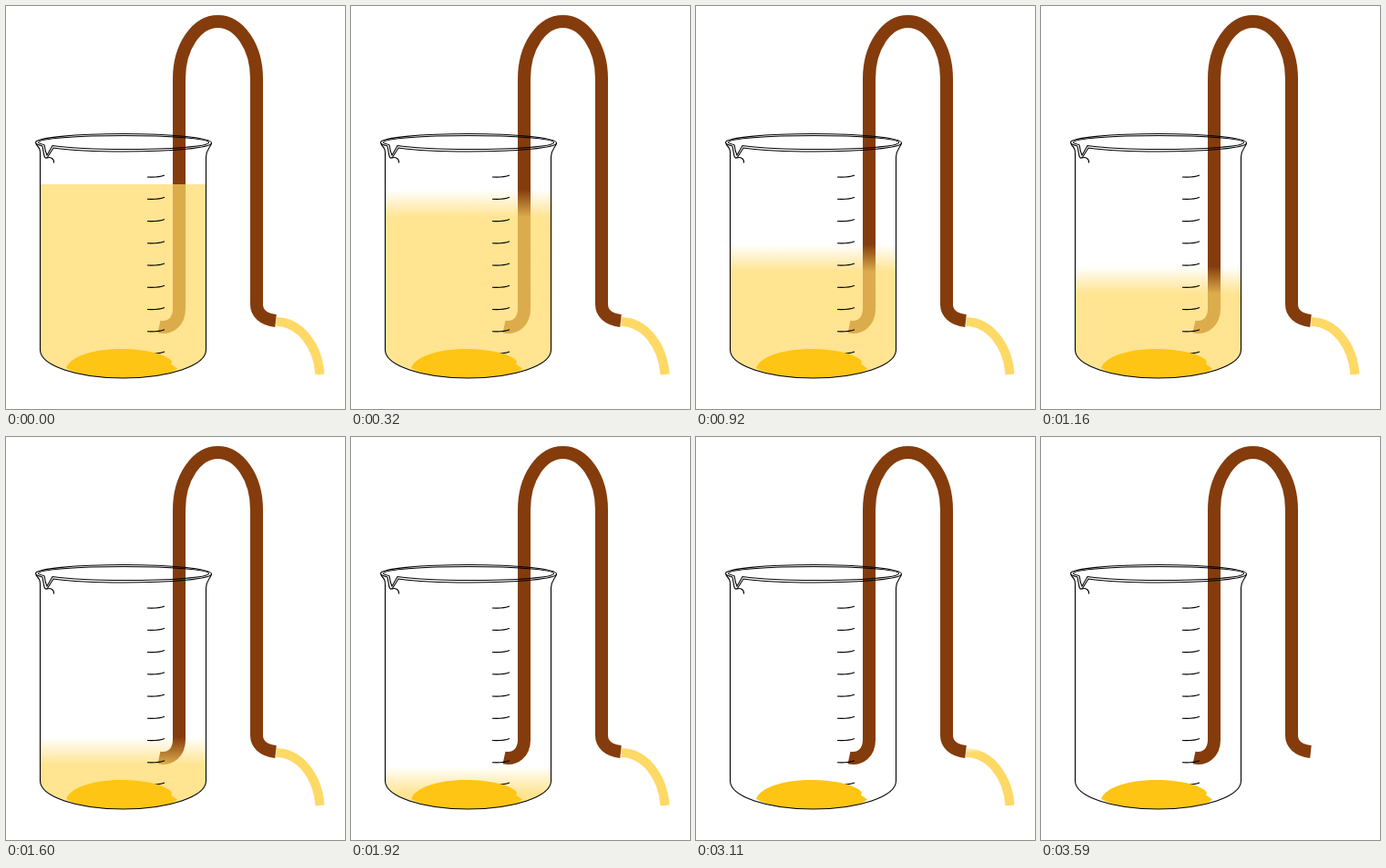
Write an HTML page with a canvas that moves like this. It is 372 px wide and 443 px high and loops after 4220 ms.

```html
<!DOCTYPE html>
<html lang="en">
<head>
<meta charset="utf-8">
<title>Siphon</title>
<style>
html, body { margin: 0; width: 100%; height: 100%; overflow: hidden; background: #fff; }
canvas { display: block; }
</style>
</head>
<body>
<canvas id="stage" width="372" height="443"></canvas>
<script>
const ctx = document.getElementById('stage').getContext('2d');
const LOOP = 4220, STEP = 40;
const STOP = 3110, STOP_STEPS = 13;
const LEVEL = 196;
const GOLD = '255,217,102';

const tube = new Path2D(
  'M168 352.5 C180 355 190 347 190 333 V80 A42.5 63 0 0 1 275 80 V328 C275 337 282 344.5 296 346');
const stream = new Path2D('M296.5 347 C322 347.5 342 372 344.5 405');
const liquid = new Path2D(`M38 ${LEVEL} H219.5 V378 A91 31 0 0 1 37.5 378 V${LEVEL} Z`);
const sediment = new Path2D(
  'M66 398 C70 386 94 377 126 377 C152 377 178 383 182 391 L181 393.5 L188 398.5 ' +
  'C182 405 156 409 128 409 C100 409 80 406 66 398 Z');
const walls = new Path2D(
  'M33 151 C33 155 37.5 153 37.5 162 V378 A91 31 0 0 0 219.5 378 V166 C219.5 158 224 156 225.5 151');
const rim = new Path2D(
  'M40 154 C34 152.5 32.5 151 32.5 150 C32.5 145 75 140.5 129 140.5 ' +
  'C183 140.5 225.5 145 225.5 150.5 C225.5 156 183 160 129 160 C98 160 70 158.5 52 156 ' +
  'L46 165.5 Q43.5 169 42 165 L40 154');
const lip = new Path2D(
  'M42 152.5 C37 151.5 35.5 151 35.5 150 C35.5 146 77 142.5 129 142.5 ' +
  'C181 142.5 222.5 146 222.5 150 C222.5 154.5 181 157.5 129 157.5 C98 157.5 70 156 51 153.5 ' +
  'L45 164 L43.5 160 L42 152.5 M45 167 C49 165.5 53 168 52.5 172.5');

// Colour that fades in from nothing at y to full strength at y + band
function softEdge(y, band, rgb, alpha) {
  const g = ctx.createLinearGradient(0, y, 0, y + band);
  g.addColorStop(0, `rgba(${rgb},0)`);
  g.addColorStop(1, `rgba(${rgb},${alpha})`);
  return g;
}

function line(path, width, color) {
  ctx.lineWidth = width;
  ctx.strokeStyle = color;
  ctx.stroke(path);
}

function drawStream(t) {
  const done = t < STOP ? 0 : Math.min(1, (Math.floor((t - STOP) / STEP) + 1) / STOP_STEPS);
  if (done === 1) return;
  const band = 9, top = 342, bottom = 405;
  const y = top - band + (bottom - top + band) * done;
  line(stream, 10, done ? softEdge(y, band, GOLD, 1) : `rgb(${GOLD})`);
}

function drawLiquid(t) {
  const time = Math.floor(t / STEP) * STEP;
  if (time >= 2400) return;
  ctx.fillStyle = time ? softEdge(170 + time * 0.1, 30, GOLD, 0.715) : `rgba(${GOLD},0.715)`;
  ctx.fill(liquid);
}

function drawTicks() {
  const ticks = new Path2D();
  for (let i = 0; i < 9; i++) {
    const y = 188 + i * 24.25;
    ticks.moveTo(155, y);
    ticks.quadraticCurveTo(167, y + 0.7, 174, y - 2);
  }
  line(ticks, 1.2, '#000');
}

function draw(t) {
  ctx.fillStyle = '#fff';
  ctx.fillRect(0, 0, 372, 443);
  drawStream(t);
  line(tube, 14, '#843c0c');
  drawLiquid(t);
  drawTicks();
  ctx.fillStyle = '#ffc514';
  ctx.fill(sediment);
  for (const part of [walls, rim, lip]) line(part, 1.1, '#000');
}

const start = performance.now();
function frame() {
  draw((performance.now() - start) % LOOP);
  requestAnimationFrame(frame);
}
frame();
</script>
</body>
</html>
```
